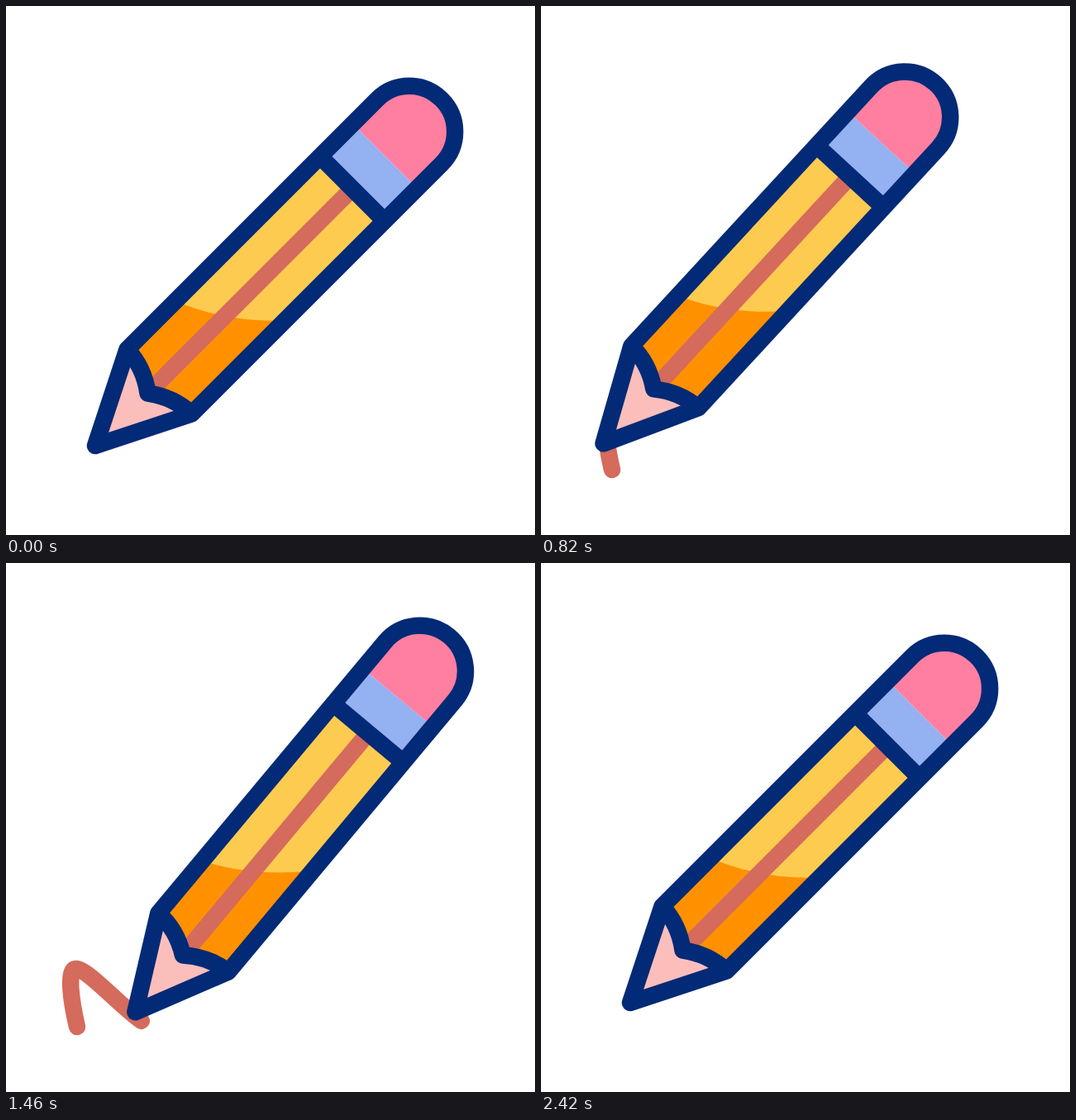
An HTML page for the animation above (3.6 s loop, 640 px wide and 640 px high).

```html
<!DOCTYPE html>
<html lang="en">
<head>
<meta charset="utf-8">
<title>Pencil</title>
<style>
  html, body { margin: 0; height: 100%; overflow: hidden; background: #fff; }
  svg { display: block; width: 100%; height: 100%; }
  .ink { fill: none; stroke: #032a76; }
  .lead { fill: none; stroke: #d46b5c; }
  .ink, .lead { stroke-width: 20.5; stroke-linejoin: round; }
</style>
</head>
<body>
<svg viewBox="0 0 640 640">
  <path id="line" class="lead" pathLength="1" stroke-linecap="round"
    d="M86 561C79 531 73 491 85 491C100 491 150 549 171 558Q180 562.5 184 558.5"/>
  <g id="pencil">
    <path fill="#fdcb50" d="M380 182L458 260L224.5 493.5L171.5 468.5L146.5 415.5Z"/>
    <path fill="#ff9100" d="M205 357Q266 383 337 380.5L224.5 493.5L171.5 468.5L146.5 415.5Z"/>
    <path class="lead" d="M419 221L171.5 468.5"/>
    <path fill="#fcbebb" d="M146.5 415.5Q167 437 171.5 468.5Q203 473 224.5 493.5L108 532Z"/>
    <path fill="#94b1f2" d="M380 182L419.5 142.5L497.5 220.5L458 260Z"/>
    <path fill="#ff7fa1" d="M419.5 142.5L449 113A55 55 0 0 1 527 191L497.5 220.5Z"/>
    <path class="ink" d="M146.5 415.5Q167 437 171.5 468.5Q203 473 224.5 493.5M380 182L458 260"/>
    <path class="ink" d="M146.5 415.5L449 113A55 55 0 0 1 527 191L224.5 493.5L108 532Z"/>
  </g>
</svg>
<script>
const LOOP = 3600, END = 2420;
const line = document.getElementById('line');
const pencil = document.getElementById('pencil');

// time, tip x, tip y, angle of the pencil
const poses = [
  [0, 108, 532, 45], [300, 103, 538, 46.2], [540, 91.5, 552.5, 49.3],
  [620, 86, 558.5, 50.1], [720, 79.5, 547, 49.2], [820, 75.5, 529.5, 47.3],
  [940, 74, 510, 43.8], [1080, 84, 502, 40.3], [1200, 94.5, 509.5, 40.77],
  [1400, 139, 534, 47.6], [1590, 184, 558, 54.1], [1640, 174, 551.5, 53.2],
  [1740, 157.5, 541.5, 51.3], [2100, 116.5, 531.5, 46.28], [END, 108, 532, 45]
];
// time, share of the line drawn
const drawn = [[590, 0], [820, 0.17], [1200, 0.45], [1590, 1]];

// Smooth interpolation that never overshoots its keys
function sample(keys, t, k) {
  const last = keys.length - 1;
  if (t <= keys[0][0]) return keys[0][k];
  if (t >= keys[last][0]) return keys[last][k];
  const slope = i => (keys[i + 1][k] - keys[i][k]) / (keys[i + 1][0] - keys[i][0]);
  const tangent = i => {
    if (i === 0 || i === last) return 0;
    const a = slope(i - 1), b = slope(i);
    return a * b > 0 ? 2 * a * b / (a + b) : 0;
  };
  const i = keys.findIndex(key => key[0] > t) - 1;
  const span = keys[i + 1][0] - keys[i][0];
  const u = (t - keys[i][0]) / span, v = 1 - u;
  return v * v * (1 + 2 * u) * keys[i][k] + u * u * (3 - 2 * u) * keys[i + 1][k]
    + span * u * v * (v * tangent(i) - u * tangent(i + 1));
}

function draw(t) {
  const [x, y, angle] = [1, 2, 3].map(k => sample(poses, t, k));
  pencil.setAttribute('transform',
    `translate(${x - 108} ${y - 532}) rotate(${45 - angle} 108 532)`);

  const left = Math.min(1, Math.max(0, (END - t) / 910));
  const from = 1 - left * left;
  const length = sample(drawn, t, 1) - from;
  line.style.visibility = length > 0 ? 'visible' : 'hidden';
  line.style.strokeDasharray = `${Math.max(length, 0)} 2`;
  line.style.strokeDashoffset = -from;
}

const start = performance.now();
function tick() {
  draw((performance.now() - start) % LOOP);
  requestAnimationFrame(tick);
}
tick();
</script>
</body>
</html>
```
